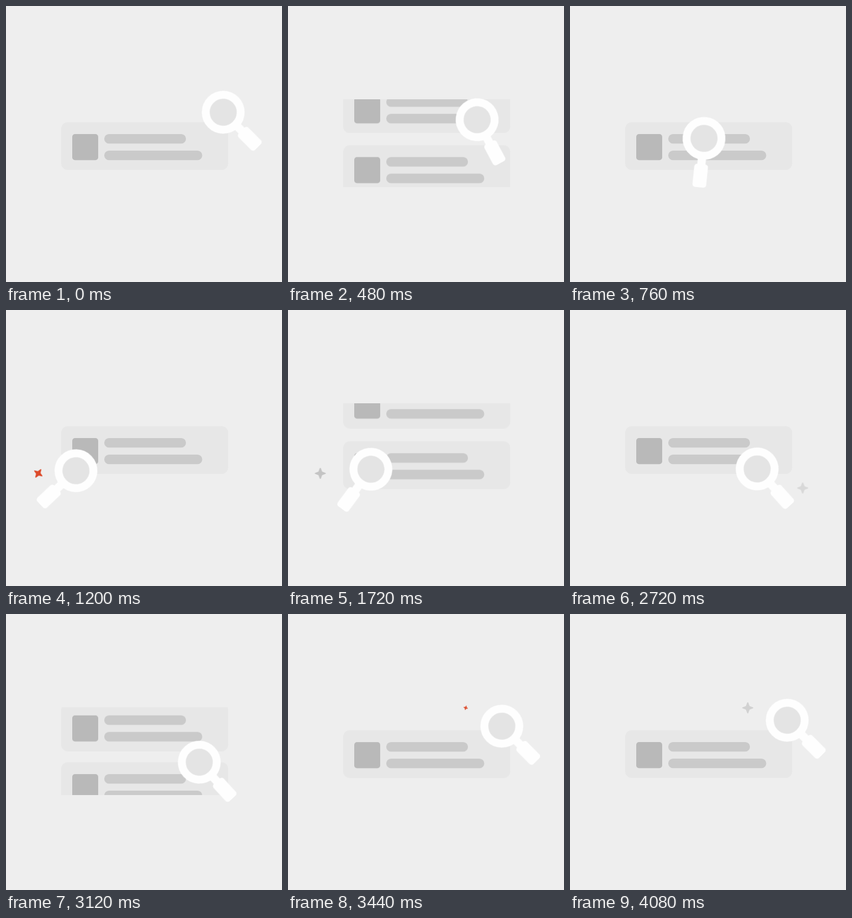
Write an HTML page without scripts that moves like this. It is 500 px wide and 500 px high and loops after 4200 ms.

```html
<!DOCTYPE html>
<html lang="en">
<head>
<meta charset="utf-8">
<title>Searching</title>
<style>
  html, body { margin: 0; width: 100%; height: 100%; overflow: hidden; background: #eee; }
  svg { display: block; width: 100%; height: 100%; }

  /* Everything shares one loop; --at is when a part starts its move */
  .leave, .enter, .lens, .spark {
    animation: 4.2s cubic-bezier(.333, 0, .667, 1) var(--at, 0s) infinite;
  }

  /* The resting card slides out, the next one slides in and takes its place */
  .leave { animation-name: leave; }
  .enter { animation-name: enter, appear; opacity: 0; }
  @keyframes leave {
    0% { transform: none; opacity: 1; }
    14.28% { transform: translateY(-113px); opacity: 0; }
    14.29%, 100% { transform: none; opacity: 1; }
  }
  .leave { animation-name: leave, fade; }
  @keyframes fade {
    0%, 9.3% { opacity: 1; }
    14.28% { opacity: 0; }
    14.29%, 100% { opacity: 1; }
  }
  @keyframes enter {
    0% { transform: translateY(101.5px); }
    14.28%, 100% { transform: none; }
  }
  @keyframes appear {
    0% { opacity: 0; }
    6.4%, 14.28% { opacity: 1; }
    14.29%, 100% { opacity: 0; }
  }

  /* Magnifier: three stops on one closed path, turning on the way */
  .lens {
    offset-path: path("M393.5 192.5Q259 225 124 292.5Q231.5 274 339 288L393.5 192.5");
    offset-rotate: 0deg;
    animation-name: travel;
  }
  @keyframes travel {
    0%, 4.45% { offset-distance: 0%; transform: rotate(45deg); }
    30.1%, 37.6% { offset-distance: 46.9%; transform: rotate(137.5deg); }
    53%, 69.9% { offset-distance: 82.1%; transform: rotate(48deg); }
    85.1%, 100% { offset-distance: 100%; transform: rotate(45deg); }
  }

  /* Sparkles pop, turn grey and fade */
  .spark {
    fill: currentColor;
    stroke: currentColor;
    stroke-width: 2;
    stroke-linejoin: round;
    opacity: 0;
    animation-name: pop, vanish;
    animation-timing-function: linear;
  }
  @keyframes pop {
    0% { transform: rotate(0deg) scale(0); }
    4% { transform: rotate(38deg) scale(1); }
    9.5%, 100% { transform: rotate(90deg) scale(1); }
  }
  @keyframes vanish {
    0%, 7% { color: #dc4a2a; opacity: 1; }
    15%, 16% { color: #c4c4c4; opacity: 1; }
    19%, 100% { color: #c4c4c4; opacity: 0; }
  }

  .first { --at: .145s; }
  .second { --at: 1.326s; }
  .third { --at: 1.965s; }
  .fourth { --at: 2.85s; }
</style>
</head>
<body>
<svg viewBox="0 0 500 500">
  <defs>
    <clipPath id="view"><rect y="169" width="500" height="159"/></clipPath>
    <g id="card">
      <rect x="100" y="210.5" width="302.5" height="86.5" rx="12" fill="#e7e7e7"/>
      <rect x="120" y="232" width="47" height="47.3" rx="5" fill="#b9b9b9"/>
      <rect x="178" y="232" width="148" height="17.3" rx="8.6" fill="#cacaca"/>
      <rect x="178" y="262" width="177.5" height="17.3" rx="8.6" fill="#cacaca"/>
    </g>
    <path id="star" d="M0-9L2.5-2.5 9 0 2.5 2.5 0 9-2.5 2.5-9 0-2.5-2.5z"/>
  </defs>

  <g clip-path="url(#view)">
    <g class="leave first"><g class="leave second"><g class="leave third"><g class="leave fourth">
      <use href="#card"/>
    </g></g></g></g>
    <g class="enter first"><use href="#card"/></g>
    <g class="enter second"><use href="#card"/></g>
    <g class="enter third"><use href="#card"/></g>
    <g class="enter fourth"><use href="#card"/></g>
  </g>

  <g transform="translate(58.5 296)"><g class="spark" style="--at:1.05s"><use href="#star"/></g></g>
  <g transform="translate(421.5 322.5)"><g class="spark" style="--at:1.99s"><use href="#star"/></g></g>
  <g transform="translate(322 170)"><g class="spark" style="--at:3.37s"><use href="#star"/></g></g>

  <g class="lens">
    <rect x="35" y="-7.5" width="18" height="15" fill="#fefefe"/>
    <rect x="47" y="-12.5" width="42" height="25" rx="5" fill="#fefefe"/>
    <circle r="31.6" fill="#e4e4e4" stroke="#fefefe" stroke-width="14.3"/>
  </g>
</svg>
</body>
</html>
```
